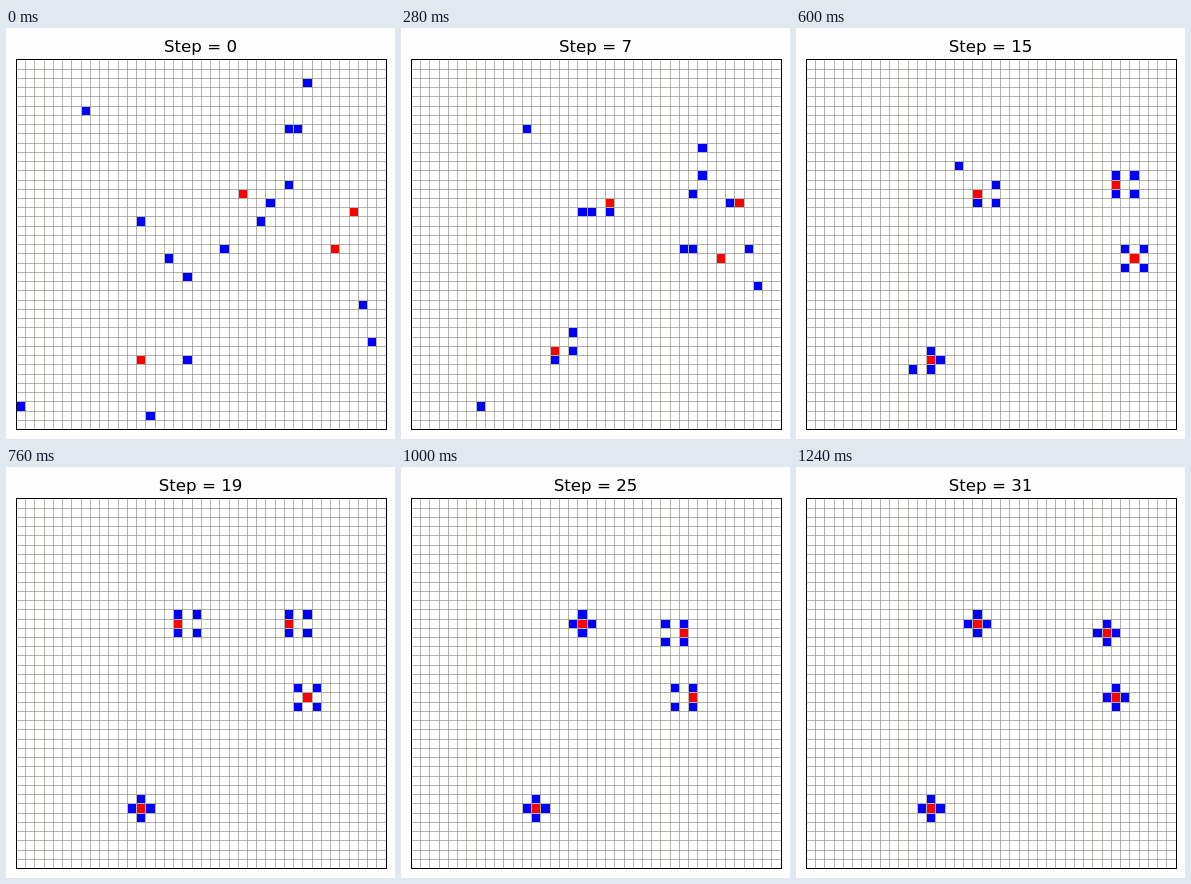
An HTML page with a canvas for the animation above (1280 ms loop, 389 by 411 pixels).

```html
<!DOCTYPE html>
<html lang="en">
<head>
<meta charset="utf-8">
<title>Pursuit on a grid</title>
<style>
  html, body { margin: 0; width: 100%; height: 100%; overflow: hidden; background: #fefefe; }
  canvas { display: block; }
</style>
</head>
<body>
<canvas id="stage" width="389" height="411"></canvas>
<script>
const ctx = document.getElementById('stage').getContext('2d');
const STEP_MS = 40, STEPS = 32, CELLS = 40, PITCH = 9.245;

// Formations: where the four hunters stand relative to their prey.
const box = (west, east) => [[west, -1], [west, 1], [east, -1], [east, 1]];
const LEAD = box(0, 2), WIDE = box(0, 3), TRAIL = box(-2, 0), SPLIT = box(-1, 1);
const CROSS = [[-1, 0], [0, 1], [0, -1], [1, 0]];

// Each leg: the step at which it ends, the prey's cell then, the formation aimed for.
const packs = [
  {
    prey: [24, 14],
    hunters: [[7, 5], [16, 21], [13, 17], [27, 15]],
    legs: [[11, 19, 15, LEAD], [15, 18, 14, LEAD], [19, 17, 13, LEAD], [22, 18, 13, CROSS]],
  },
  {
    prey: [36, 16],
    hunters: [[29, 7], [30, 7], [31, 2], [29, 13]],
    legs: [[11, 34, 14, TRAIL], [15, 33, 13, LEAD], [21, 27, 13, WIDE],
           [25, 29, 14, TRAIL], [28, 32, 14, TRAIL], [31, 32, 14, CROSS]],
  },
  {
    prey: [34, 20],
    hunters: [[22, 20], [26, 17], [37, 26], [38, 30]],
    legs: [[11, 33, 21, LEAD], [15, 35, 21, SPLIT], [22, 28, 21, WIDE],
           [25, 30, 21, TRAIL], [28, 33, 21, TRAIL], [31, 33, 21, CROSS]],
  },
  {
    prey: [13, 32],
    hunters: [[0, 37], [14, 38], [18, 23], [18, 32]],
    legs: [[11, 16, 31, CROSS], [15, 13, 32, CROSS], [19, 13, 33, CROSS]],
  },
];

// One cell towards the goal, along the axis with the larger gap.
function approach([x, y], [goalX, goalY]) {
  const dx = goalX - x, dy = goalY - y;
  return Math.abs(dx) > Math.abs(dy) ? [x + Math.sign(dx), y] : [x, y + Math.sign(dy)];
}

// The prey and hunter cells of one pack at every step.
function chase({ prey, hunters, legs }) {
  const history = [{ prey, hunters }];
  let from = prey, start = 0;
  for (const [end, x, y, formation] of legs) {
    for (let step = start + 1; step <= end; step++) {
      const t = (step - start) / (end - start);
      prey = [x, y].map((to, axis) => Math.round(from[axis] + (to - from[axis]) * t));
      hunters = hunters.map((cell, i) =>
        approach(cell, [x + formation[i][0], y + formation[i][1]]));
      history.push({ prey, hunters });
    }
    from = [x, y];
    start = end;
  }
  return history;
}

const histories = packs.map(chase);

const lineX = i => Math.floor(10.375 + PITCH * i);
const lineY = i => Math.floor(31.825 + PITCH * i);

function drawCell([x, y], color) {
  const left = lineX(x) + 1, top = lineY(y) + 1;
  ctx.fillStyle = color;
  ctx.fillRect(left, top, lineX(x + 1) - left, lineY(y + 1) - top);
}

function drawGrid() {
  ctx.fillStyle = 'rgba(128, 128, 120, 0.6)';
  for (let i = 1; i < CELLS; i++) {
    ctx.fillRect(lineX(i), 31, 1, 370);
    ctx.fillRect(10, lineY(i), 370, 1);
  }
  ctx.strokeStyle = '#000';
  ctx.strokeRect(10.5, 31.5, 370, 370);
}

function draw(step) {
  ctx.fillStyle = '#fefefe';
  ctx.fillRect(0, 0, 389, 411);
  drawGrid();
  for (const history of histories) {
    const { prey, hunters } = history[Math.min(step, history.length - 1)];
    hunters.forEach(cell => drawCell(cell, '#00f'));
    drawCell(prey, '#f00');
  }
  ctx.fillStyle = '#000';
  ctx.font = '16.67px "DejaVu Sans", sans-serif';
  ctx.textAlign = 'center';
  ctx.fillText('Step = ' + step, 194.5, 24);
}

function tick() {
  draw(Math.floor(performance.now() / STEP_MS) % STEPS);
  requestAnimationFrame(tick);
}
tick();
</script>
</body>
</html>
```
